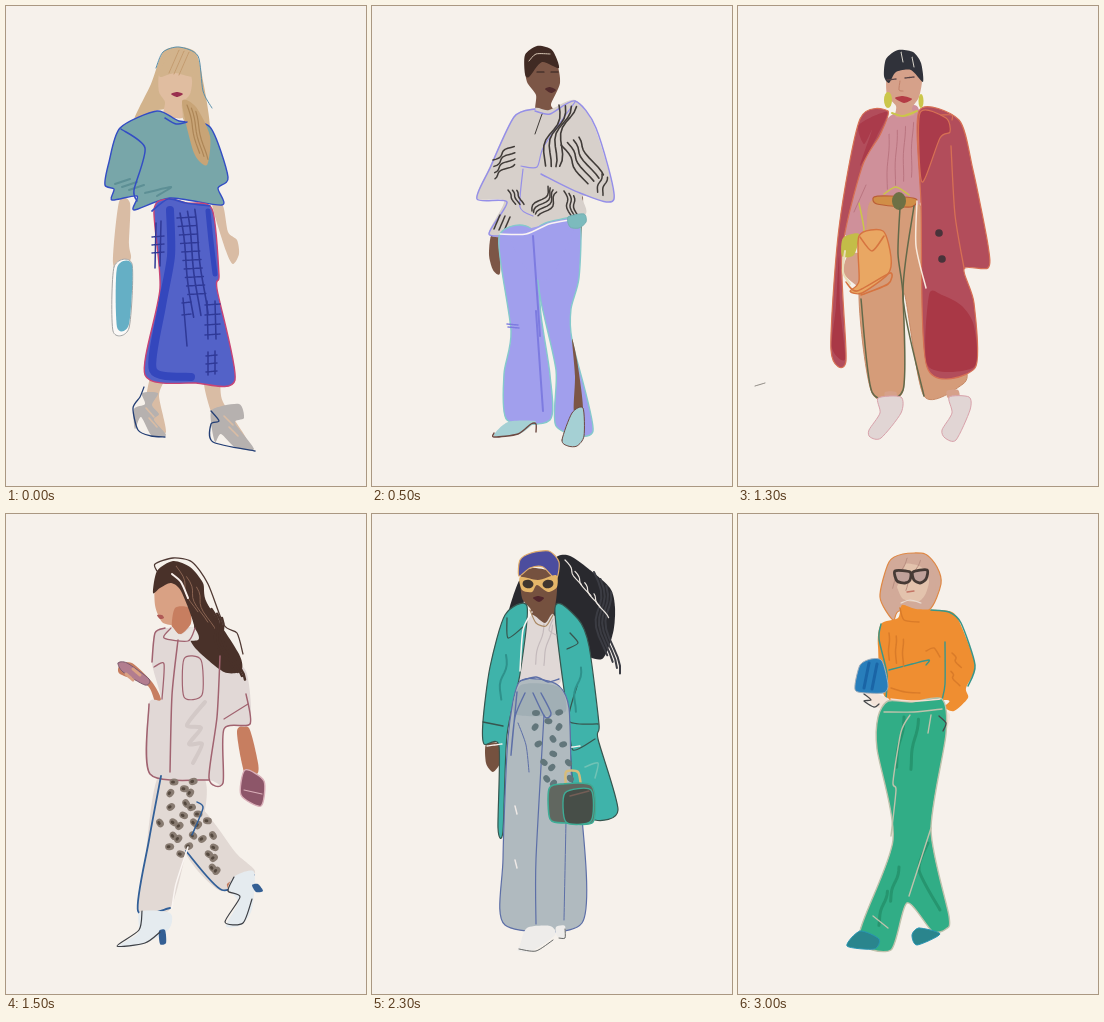
An HTML page with a canvas for the animation above (3500 ms loop, 360x480 px).

```html
<!DOCTYPE html>
<html lang="en">
<head>
<meta charset="utf-8">
<title>Seven looks</title>
<style>
html, body { margin: 0; width: 100%; height: 100%; overflow: hidden; background: #f6f1eb; }
canvas { display: block; }
</style>
</head>
<body>
<canvas id="stage" width="360" height="480"></canvas>
<script>
const ctx = document.getElementById('stage').getContext('2d');
const PAPER = '#f6f1eb', HOLD = 500;

// Traces a softly rounded curve through "x,y x,y ..." points.
function trace(text, closed) {
  const pts = text.split(' ').map(p => p.split(',').map(Number));
  const n = pts.length, k = 0.13;
  const at = i => closed ? pts[(i + n) % n] : pts[Math.max(0, Math.min(n - 1, i))];
  ctx.beginPath();
  ctx.moveTo(...pts[0]);
  for (let i = 0; i < (closed ? n : n - 1); i++) {
    const [a, b, c, d] = [at(i - 1), at(i), at(i + 1), at(i + 2)];
    ctx.bezierCurveTo(b[0] + (c[0] - a[0]) * k, b[1] + (c[1] - a[1]) * k,
      c[0] - (d[0] - b[0]) * k, c[1] - (d[1] - b[1]) * k, c[0], c[1]);
  }
}

function stroke(color, width) {
  ctx.strokeStyle = color;
  ctx.lineWidth = width;
  ctx.stroke();
}

function shape(color, pts, edge, width = 1.4) {
  trace(pts, true);
  ctx.fillStyle = color;
  ctx.fill();
  if (edge) stroke(edge, width);
}

function ink(color, width, pts) {
  trace(pts, false);
  stroke(color, width);
}

function dot(color, x, y, rx, ry = rx, turn = 0) {
  ctx.beginPath();
  ctx.ellipse(x, y, rx, ry, turn, 0, 7);
  ctx.fillStyle = color;
  ctx.fill();
}

// Parallel hand-drawn strokes along (dx, dy), each moved on by (sx, sy).
function strands(color, width, count, x, y, dx, dy, sx, sy, sway = 0) {
  for (let i = 0; i < count; i++) {
    ctx.beginPath();
    for (let t = 0; t <= 1.01; t += 0.1) {
      const bend = sway * Math.sin(t * 7 + i * 0.5);
      ctx.lineTo(x + i * sx + dx * t + bend, y + i * sy + dy * t + bend * 0.4);
    }
    stroke(color, width);
  }
}

// Staggered spots between two slanted edges.
function spots(color, x, y, cols, rows, gapX, gapY, slant, draw = dot) {
  for (let r = 0; r < rows; r++) for (let c = 0; c < cols; c++) {
    const wobble = Math.sin(r * 5 + c * 3);
    draw(color, x + c * gapX + r * slant + wobble * 3, y + r * gapY + (c % 2) * gapY / 2 + wobble * 2, 4, 3, wobble);
  }
}

function blueSkirt() {
  const skin = '#d9bca4', hair = '#d2b38c', teal = '#78a6a9', blue = '#334dc4', navy = '#2f3997';
  shape(skin, '113,196 124,197 123,238 125,252 117,264 107,257');
  shape(skin, '206,198 217,200 222,226 231,234 233,248 227,258 220,245');
  shape(skin, '145,370 158,373 153,390 160,426 147,426 139,404');
  shape(skin, '198,375 213,376 217,396 242,436 223,434 206,408');
  shape(hair, '157,46 173,41 190,47 198,80 204,122 200,160 174,108 152,104 128,115 145,78');
  shape('#e0bda0', '153,69 162,61 181,62 186,74 184,88 176,98 176,112 158,109 159,96 153,86');
  shape(hair, '155,62 165,48 181,48 187,70 169,67 154,71');
  strands('#c49c70', 1, 3, 173, 44, -10, 23, 5, 1);
  shape('#99304f', '165,88 171,86 177,88 171,91');
  shape(teal, '151,105 173,115 204,121 222,171 212,182 216,199 164,192 128,204 131,190 106,194 108,183 99,179 103,156 114,122', blue);
  shape('#c8a476', '176,96 190,101 204,130 201,159 188,147');
  strands('#ad8657', 1.2, 3, 181, 99, 12, 48, 4, 3, 1);
  strands('#5d8f95', 2, 3, 109, 178, 15, -5, 7, 3);
  ink('#5d8f95', 2, '139,187 165,181 151,190');
  ink(blue, 1.5, '115,123 139,142 128,184 131,195');
  ink(blue, 1.5, '159,112 170,118 181,116');
  ink('#5990ac', 1, '150,62 157,46 173,41 192,50 197,85 206,102');
  shape('#5362c8', '148,204 162,193 180,197 206,203 213,269 211,283 229,374 190,377 139,369 154,282', '#c84475');
  ink('#3447bd', 8, '164,204 165,250 156,300 147,364 185,371');
  ink('#3447bd', 5, '202,205 205,235 209,268');
  ink(blue, 1.7, '146,205 162,193 180,197 204,200');
  strands(navy, 1.6, 3, 174, 207, 13, 104, 7, -2, 1);
  strands(navy, 1.4, 10, 171, 212, 18, -1, 1.2, 8.5);
  strands(navy, 1.5, 2, 150, 217, -1, 45, 5, -2);
  strands(navy, 1.4, 3, 146, 231, 12, -1, 0, 8);
  strands(navy, 1.5, 2, 201, 295, 1, 38, 8, 0);
  strands(navy, 1.4, 4, 199, 299, 15, -1, 0, 10);
  strands(navy, 1.5, 2, 202, 346, 0, 23, 7, -1);
  strands(navy, 1.4, 3, 200, 350, 11, -1, 0, 8);
  strands(navy, 1.5, 1, 177, 292, 4, 48, 0, 0);
  strands(navy, 1.4, 2, 176, 297, 9, -1, 0, 12);
  shape('#fbf9f7', '108,261 126,258 123,322 107,325', '#a4a5a5', 1);
  shape('#65afc5', '111,262 126,259 123,318 111,321');
  shape('#b6b1af', '136,387 152,387 146,399 153,408 148,414 160,429 146,430 135,411 129,423 128,403 139,398');
  shape('#b6b1af', '207,403 233,398 238,412 229,417 248,443 229,441 215,428 209,436 205,416');
  strands(skin, 1.6, 2, 140, 402, 8, 9, 3, 10);
  strands(skin, 1.6, 2, 218, 410, 9, 9, 5, 11);
  ink('#243f75', 1.3, '138,381 134,391 127,402 132,424 145,430 159,431');
  ink('#243f75', 1.3, '205,405 213,415 205,418 207,436 249,445');
}

function lavenderTrousers() {
  const skin = '#7c5646', violet = '#958fe8', mint = '#85c9cc', black = '#403b38';
  shape(skin, '154,60 168,53 184,57 188,77 179,98 182,105 164,105 164,89 155,76');
  shape(skin, '203,187 211,191 208,246 202,256 194,248 202,219');
  shape(skin, '119,230 127,230 128,267 121,264 117,249');
  shape('#402a23', '153,68 153,49 165,40 180,44 187,62 170,56 157,71');
  strands('#2e211e', 1.2, 2, 165, 66, 7, 0, 14, 0);
  ink('#d8c7b5', 1, '157,55 164,48 178,48');
  shape('#522b2c', '173,83 178,81 184,84 179,87');
  shape('#d7d0cb', '163,102 177,104 203,94 223,122 242,193 211,190 213,209 168,222 147,231 117,228 132,195 105,192 118,160 142,111');
  ink(violet, 1.5, '163,103 142,111 118,162 105,193 135,196 117,228 143,229');
  ink(violet, 1.5, '163,105 178,108 203,95 224,122 242,193 208,187 169,168');
  ink(violet, 1.2, '203,96 172,140 165,161 149,160');
  ink(violet, 1.2, '151,163 148,201 161,210');
  strands(black, 1.6, 4, 187, 99, -16, 60, 4.5, 0, 4);
  strands(black, 1.6, 4, 189, 139, 25, 38, 5, -3, 3);
  strands(black, 1.5, 4, 121, 154, 20, -14, 0, 6, 2);
  strands(black, 1.5, 4, 160, 205, 18, -24, 3, 2, -3);
  strands(black, 1.5, 3, 192, 185, 7, 26, 4, 2, 2);
  strands(black, 1.5, 3, 136, 184, 7, 14, 4, 0, 1);
  strands(black, 1.5, 3, 128, 209, -6, 14, 5, 1);
  strands(black, 1.5, 2, 230, 168, -5, 18, 5, 3, 1);
  strands(black, 1, 1, 170, 108, -7, 20, 0, 0);
  shape('#a19fed', '127,231 161,225 169,309 178,369 178,414 135,414 132,368 139,325', mint);
  shape('#a19fed', '163,226 190,213 208,216 207,272 199,303 200,334 221,425 184,420 184,364 168,290', mint);
  shape('#a19fed', '140,231 190,215 204,217 180,270 160,270');
  shape(skin, '200,333 205,354 211,402 202,405 203,370');
  strands('#7d7be0', 1.4, 2, 135, 318, 11, 1, 1, 3);
  strands('#7d7be0', 2, 2, 161, 230, 7, 100, 3, 75);
  ink('#faf4f3', 1.5, '128,228 154,228 177,218 198,214');
  shape('#7cbbbd', '196,211 212,208 214,216 207,222 198,221', '#74afb2', 1);
  shape('#a5d0d4', '122,430 136,416 163,415 160,419 147,428');
  shape('#a5d0d4', '190,434 200,407 211,402 212,430 205,440 196,440', '#6c4841', 1);
  ink('#6c4841', 1.4, '122,427 122,431 146,428 159,418 164,418 164,426');
}

function redCoat() {
  const skin = '#d6a18a', edge = '#d77054', lime = '#cbc64a', dark = '#a93846';
  shape('#d59c79', '132,193 179,195 189,249 189,350 226,363 225,378 186,390 166,287 165,385 134,387 121,290', '#c88b68', 1);
  shape('#cf909a', '150,112 160,106 181,104 183,196 134,194 127,226 106,226 122,156 139,126');
  shape('#b24d5b', '150,105 122,113 101,222 93,344 108,355 104,247 124,161 142,129', edge, 1.2);
  shape('#b24d5b', '181,105 221,114 235,164 250,239 250,262 226,263 236,297 237,362 189,361 183,198', edge, 1.2);
  shape(dark, '191,289 204,289 224,300 236,320 236,361 190,360');
  shape(dark, '101,250 98,300 94,342 107,353 102,300');
  shape('#aa3b4b', '149,106 121,119 126,138 134,124 122,160 139,130');
  shape('#aa3b4b', '182,107 208,112 212,126 202,132 184,176', edge, 1.2);
  ink(edge, 1.3, '213,140 217,209 226,262');
  ink(edge, 1.2, '203,109 214,109 214,114');
  shape(skin, '149,69 159,61 176,63 184,72 181,91 174,102 176,109 158,111 158,100 149,89');
  shape(skin, '109,251 121,248 132,274 126,284 106,268');
  shape('#30323a', '146,70 148,53 160,44 175,46 183,57 185,76 173,64 158,66 151,77');
  strands('#d8d4ca', 1, 2, 163, 46, 2, 10, 11, 5);
  strands('#584344', 1.3, 2, 149, 74, 9, -1, 18, -2);
  ink('#c18169', 1, '162,75 161,84 165,85');
  shape('#b43c45', '157,92 165,90 174,93 166,97');
  dot(lime, 150, 94, 4, 8);
  dot(lime, 183, 95, 2.5, 7);
  ink(lime, 2, '154,107 165,110 179,105');
  ink(lime, 1.6, '108,231 126,229 121,197');
  shape('#c3bd48', '105,232 121,228 116,249 104,250');
  strands('#ba7580', 1, 4, 151, 128, -2, 55, 8, -4, 0.6);
  ink('#ba7580', 1, '116,206 128,179');
  shape('#d08e47', '136,191 153,190 178,193 173,201 139,198', '#bb5f36', 1.2);
  ink(lime, 1.5, '146,188 158,181 171,189');
  dot('#6e7045', 161, 195, 7, 9);
  ink('#63694a', 1.5, '162,202 160,248 165,290 165,384 134,386 123,293');
  ink('#63694a', 1.5, '176,200 165,291 186,390');
  ink('#f9eadd', 1.5, '179,195 178,240 188,282');
  shape('#e9a763', '121,230 145,225 153,251 150,268 124,287 112,285 121,275', '#d67440');
  ink('#d67440', 1.6, '122,231 134,245 146,230');
  ink('#d67440', 1.6, '108,276 119,285 152,267 150,278 123,289');
  ink('#e9ddb7', 2, '107,245 105,266 112,278');
  dot('#48333a', 201, 227, 3.8);
  dot('#48333a', 204, 253, 3.8);
  shape(skin, '147,386 158,386 158,394 148,394');
  shape(skin, '209,385 220,384 221,392 210,392');
  shape('#e1d5d4', '140,392 163,391 163,407 143,432 132,431 131,424 142,407', '#d8a1aa', 1);
  shape('#e1d5d4', '211,391 231,391 232,404 218,434 207,432 204,424 214,407', '#d8a1aa', 1);
  ink('#77716b', 0.8, '17,380 27,377');
}

function leopardTrousers() {
  const skin = '#c77e60', edge = '#a16370', blue = '#315f98', black = '#3e4045';
  shape('#e2d9d4', '153,261 197,263 199,296 183,328 164,395 132,397 139,346');
  shape('#e2d9d4', '192,292 230,339 249,359 215,377 179,337');
  shape(skin, '231,217 243,214 252,249 251,260 239,261');
  shape(skin, '114,151 126,149 146,168 155,185 151,194 142,172 114,160');
  shape(skin, '221,370 232,364 234,375 225,378');
  shape('#e1d8d6', '163,114 149,118 146,149 155,185 143,190 144,260 203,266 217,269 218,214 244,210 240,157 215,142 192,115');
  ink('#d3c9c7', 4, '199,188 181,211 195,214 183,230 196,230 187,249');
  shape('#d9a184', '150,64 166,58 176,74 185,108 173,120 167,112 156,108 149,91');
  shape(skin, '169,94 183,94 185,109 175,120 166,113');
  shape('#493129', '147,79 151,57 167,47 184,53 197,69 201,89 233,140 235,157 218,158 193,138 184,125 188,111 175,77 165,69 154,74');
  strands('#896351', 1, 3, 170, 52, 20, 45, 9, 10, 3);
  strands('#493129', 2.5, 4, 199, 90, 24, 62, 4, 4, 5);
  ink('#4f3933', 1.3, '151,57 149,50 167,44 186,48 202,70 218,111 231,119 237,140');
  ink('#f9efeb', 2, '166,60 175,68 182,84');
  shape('#b05a56', '151,101 156,101 158,104 154,105');
  shape('#e9e3df', '165,112 174,121 187,113 192,126 160,125');
  ink(edge, 1.5, '159,114 149,119 146,148');
  ink(edge, 1.5, '143,190 144,260 203,266');
  ink(edge, 1.3, '156,185 158,150 148,153');
  ink(edge, 1.3, '165,114 158,124 182,127 189,114');
  ink(edge, 1.5, '172,126 166,181 164,258');
  ink(edge, 1.5, '214,142 211,203 203,264 217,269 218,215 244,210 240,180');
  ink(edge, 1.2, '242,190 218,205');
  shape('#e1d8d6', '178,145 195,146 196,181 178,183', edge, 1.2);
  shape('#b27d8f', '112,149 121,149 143,165 139,171 117,158', '#7c5c6f', 1);
  strands('#d9a184', 3, 2, 120, 160, 7, 6, 7, -5);
  const rosette = (color, x, y, rx, ry, turn) => {
    dot(color, x, y, rx + 0.5, ry + 0.5, turn);
    dot('#54483e', x - 1, y, 2, 1.5, turn);
  };
  spots('#887b71', 168, 268, 3, 6, 10, 13, -0.8, rosette);
  spots('#887b71', 192, 300, 2, 5, 9, 13, 3, rosette);
  rosette('#887b71', 154, 309, 4, 3, 1);
  ink(blue, 1.8, '155,262 143,326 132,397 164,394');
  ink(blue, 1.8, '180,337 216,376 248,361');
  ink(blue, 1.5, '186,321 197,294 191,288');
  ink('#faf5f2', 1.5, '182,333 170,370 166,394');
  shape('#8d5669', '239,256 258,267 255,292 235,281', '#d9afb8');
  ink('#d9afb8', 1.2, '238,276 256,280');
  shape('#e5ebef', '134,398 164,399 163,415 138,430 111,433 132,419');
  shape('#e5ebef', '229,362 248,358 246,395 235,411 220,412 232,388 222,375');
  shape('#345f94', '153,417 159,416 160,429 154,430');
  shape('#345f94', '246,371 252,370 257,377 250,378');
  ink(black, 1.2, '136,397 133,416 111,432 139,429 154,418');
  ink(black, 1.2, '228,363 222,377 234,383 219,408 237,409 246,385');
}

function tealCoat() {
  const skin = '#75513f', teal = '#3fb3aa', dark = '#37564f', blue = '#5d6fa7', white = '#f9f4f1';
  shape('#29292e', '181,49 195,41 213,52 238,74 243,94 241,119 230,145 207,137 182,107');
  shape('#29292e', '147,67 136,101 149,96 153,78');
  strands('#3b3c43', 2, 4, 222, 58, 10, 82, 4, 6, 5);
  strands('#ebe5df', 1.2, 4, 193, 46, 15, 24, 9, 11, 2);
  shape(skin, '149,61 161,54 182,59 185,77 179,108 160,113 159,96 150,84');
  shape(skin, '114,230 127,230 129,247 121,258 114,249');
  shape(skin, '193,236 212,236 214,252 207,260 195,259');
  shape('#4c4d9e', '147,62 148,46 159,39 177,37 187,48 184,65 171,53 158,54', '#dfac6b', 1.2);
  shape('#e0d8d6', '159,101 173,109 181,100 190,120 188,169 147,169 151,125');
  shape(teal, '155,92 133,101 118,153 111,207 112,230 127,232 126,314 131,317 135,221 148,160', dark, 1.2);
  shape(teal, '183,94 206,105 217,132 227,210 226,225 246,296 223,306 203,287 196,207', dark, 1.2);
  ink(dark, 1.3, '135,104 136,124 151,113');
  ink(dark, 1.3, '198,119 206,129 195,135');
  ink(dark, 1.3, '111,208 131,212');
  ink(dark, 1.3, '205,172 197,207 226,210');
  ink(dark, 1.3, '197,207 201,236 223,225');
  strands('#2e918b', 2, 2, 134, 141, -6, 44, 74, 12, 2);
  ink('#71c3b6', 1.5, '213,253 226,249 223,264');
  ink(white, 1.5, '160,98 151,116 148,157');
  strands(white, 1.3, 2, 115, 232, 15, -2, 78, 2);
  shape('#b0babf', '146,170 166,165 187,172 197,194 200,270 210,304 210,409 133,411 131,345 136,224', blue, 1.2);
  shape('#a1afb5', '149,171 187,173 194,197 171,202 142,199');
  ink(blue, 1.4, '145,178 139,241 143,203 153,179');
  ink(blue, 1.4, '161,179 173,203 179,199 169,179');
  ink(blue, 1.2, '172,201 164,345 164,410');
  ink(blue, 1.4, '148,167 164,163 176,168 187,165');
  ink(blue, 1, '146,209 154,231 157,258');
  ink(blue, 1, '194,307 192,406');
  spots('#62767b', 164, 199, 3, 5, 12, 16, 2);
  strands('#eee9e6', 1.5, 2, 143, 292, 2, 8, 0, 54);
  strands('#c4babc', 1.2, 2, 172, 110, -9, 40, 8, 1, 1);
  ink('#c4babc', 1.2, '181,105 177,116 184,121');
  ink('#a98863', 1.2, '158,96 164,109 174,112 181,101');
  shape('#e5b669', '148,63 166,66 184,61 185,73 176,78 165,71 160,78 150,76');
  dot('#40362f', 156, 70, 5.5, 4.3, 0.2);
  dot('#40362f', 176, 70, 5.5, 4.3, -0.2);
  shape('#51262c', '161,84 166,82 172,84 167,88');
  ink('#d7bc7b', 2.5, '194,273 194,258 206,258 209,272');
  shape('#616760', '177,275 190,270 220,272 221,308 193,309 178,305', '#3eac96', 1.6);
  shape('#474e48', '193,279 219,276 219,307 194,308', '#3eac96');
  ink('#735e56', 1.5, '198,282 217,277');
  shape('#eeecea', '155,414 178,412 183,421 160,437 146,437 148,431');
  shape('#eeecea', '184,413 193,412 192,425 185,422');
  ink('#656766', 1, '147,435 164,437 181,426');
  ink('#656766', 1, '187,424 193,424 193,415');
}

// A ragged round flower.
function bloom(color, x, y, rx, ry, petals) {
  ctx.beginPath();
  for (let a = 0; a < 6.28; a += 0.1) {
    const r = 1 + 0.09 * Math.sin(a * petals);
    ctx.lineTo(x + rx * r * Math.cos(a), y + ry * r * Math.sin(a));
  }
  ctx.fillStyle = color;
  ctx.fill();
}

function floralSkirt() {
  const leg = '#bfb1a9', dark = '#292b3a', sky = '#88c5da', yellow = '#e3c13e', red = '#c34b51', navy = '#354057';
  shape(leg, '151,343 168,344 165,389 158,400 153,383');
  shape(leg, '181,344 201,344 195,397 183,397');
  shape(leg, '118,234 130,232 133,252 130,278 121,276 117,263');
  shape(dark, '137,53 143,41 157,38 174,48 165,60 187,70 188,83 158,82 152,108 142,101 141,75 149,57');
  strands('#5c5b69', 1.2, 2, 146, 47, 22, 3, 4, 16, 1);
  ink('#ae3338', 1.6, '141,51 138,41 149,34 166,35 178,43 171,59');
  ink('#ae3338', 1.6, '149,61 140,78 137,87 145,90');
  ink('#ae3338', 1.4, '165,80 172,86 187,81');
  shape('#cfc2b9', '155,82 186,83 186,104 180,117 158,117 152,104');
  shape('#c8434b', '167,99 173,98 179,100 173,104');
  shape('#e2dcd8', '151,112 187,114 209,125 222,168 188,188 147,194 137,239 120,238 118,205 127,121');
  ink(sky, 1.7, '147,111 166,122 190,118 188,113');
  ink(sky, 1.7, '149,114 128,121 118,192 114,227 120,238 130,236');
  ink(sky, 1.7, '190,120 203,121 211,137 221,166');
  ink(sky, 1.7, '146,158 154,174 142,181 149,188 137,211');
  strands('#cfc9c5', 1, 2, 132, 144, -4, 58, 67, -10);
  shape('#9bc9de', '137,219 148,195 162,186 187,184 189,261 218,274 230,331 223,344 135,345', '#dfb53a', 2);
  bloom(yellow, 150, 232, 15, 26, 9);
  bloom(navy, 148, 228, 10, 21, 11);
  shape(red, '185,187 189,193 189,225 171,224');
  shape(red, '143,269 154,257 177,262 187,303 185,330 159,337 141,328 136,300');
  bloom(yellow, 180, 278, 12, 27, 11);
  bloom(yellow, 169, 258, 14, 11, 9);
  bloom(yellow, 212, 306, 12, 14, 8);
  strands('#bd9a2b', 1, 4, 171, 262, 11, 7, 2, 10);
  shape(navy, '201,319 214,313 229,320 228,336 214,341 195,335');
  ink('#dfb53a', 2.4, '137,217 138,248 135,346 229,344');
  ink('#dfb53a', 2.2, '136,272 150,266 160,257');
  ink('#dfb53a', 2.2, '137,278 146,282 139,294 141,304');
  shape(PAPER, '193,170 199,166 216,169 249,239 221,275 187,263 188,225', '#b49f9a');
  strands('#b49f9a', 1.4, 3, 197, 170, 1, 33, 6, -2, 2);
  shape('#c4b7ae', '166,150 180,150 196,158 200,170 190,176 164,160');
  shape('#46464b', '160,146 173,145 173,156 161,155');
  ink('#cbc4c0', 2, '167,153 174,155');
  shape('#e8dfdc', '151,390 168,390 164,430 152,427');
  shape('#e8dfdc', '180,386 198,387 204,400 190,414 190,430 180,433');
  for (const x of [150, 166, 179, 200]) strands('#3e3f44', 1.3, 1, x, 380, 1, x % 3 ? 20 : 34, 0, 0, 3);
  ink('#3e3f44', 1.3, '153,423 157,431 165,433');
  ink('#3e3f44', 1.3, '178,428 183,435 188,430');
}

function greenTrousers() {
  const hair = '#d2aa99', edge = '#bfc2ac', rust = '#d97b29', shade = '#26956f', frame = '#463a35';
  shape(hair, '151,48 165,40 187,40 199,53 203,70 191,96 161,97 155,106 142,83', '#df8844', 1.2);
  shape('#e3c3ad', '157,63 166,50 183,53 191,66 187,81 179,88 164,84');
  ink(hair, 6, '165,48 160,62 153,80');
  ink(hair, 6, '184,46 194,65 194,84');
  strands('#b98f81', 1, 2, 169, 44, -15, 30, 13, 2, 1);
  ink('#e9dcd3', 1.2, '163,89 172,86 183,89');
  shape('#ef8e31', '164,91 178,95 211,97 221,107 237,151 228,174 230,184 216,197 206,193 209,186 149,185 140,133 143,110 160,104');
  ink('#39968a', 1.5, '143,110 141,125 149,160 148,185');
  ink('#39968a', 1.5, '193,96 211,98 223,109 237,151 230,172');
  ink('#39968a', 1.4, '207,128 207,170 204,186');
  ink('#39968a', 1.4, '151,156 174,150 191,146 188,151');
  strands(rust, 1.5, 3, 151, 119, 0, 27, 7, 3, 0.5);
  strands(rust, 1.5, 2, 214, 139, 8, 14, -2, 18, 2);
  ink(rust, 1.4, '188,137 196,134 202,143');
  ink(rust, 1.4, '162,94 166,106 181,108');
  ink(rust, 1.4, '153,174 167,178 182,179');
  shape('#f4e4d9', '128,177 151,185 146,195 134,190');
  shape('#f4e4d9', '201,196 212,201 207,220 200,213');
  shape('#31ad86', '150,187 174,188 204,185 208,220 193,316 211,402 208,415 194,417 169,389 153,436 121,422 155,326 139,235 140,203', edge);
  strands(shade, 3, 2, 166, 203, -8, 50, 14, 2, 1);
  strands(shade, 3, 2, 161, 353, -9, 34, -12, 24, 1);
  ink(shade, 3, '190,329 181,356 202,396');
  ink(edge, 1.4, '146,198 176,198 204,195');
  ink(edge, 1.4, '172,201 163,218 155,268 158,276 153,322');
  ink(edge, 1.4, '193,314 171,382');
  ink(edge, 1.4, '193,201 190,219');
  ink(edge, 1.3, '135,402 150,414');
  ink('#f5dfd2', 1.5, '153,185 176,187 202,185');
  ink('#46484a', 1.3, '126,180 133,186 126,187 136,193 141,190');
  ink('#46484a', 1.3, '201,202 208,209 205,217');
  shape('#287ebb', '122,151 133,145 144,147 150,171 145,179 120,178 117,171', '#9faebb', 1);
  strands('#1a65a6', 3, 2, 131, 149, -5, 25, 8, 1);
  shape('#bfa19a', '157,57 172,58 172,66 167,69 159,67', frame, 2.8);
  shape('#bfa19a', '175,58 189,56 188,65 182,69 176,66', frame, 2.8);
  ink('#c37465', 1.3, '169,78 176,77');
  shape('#2a858d', '122,417 141,425 136,435 109,432', '#2995b3', 1);
  shape('#2a858d', '181,414 202,420 179,431 174,421', '#2995b3', 1);
}

const looks = [blueSkirt, lavenderTrousers, redCoat, leopardTrousers, tealCoat, floralSkirt, greenTrousers];
const start = performance.now();
let shown = -1;

function render(now) {
  const index = Math.floor(Math.max(0, now - start) / HOLD) % looks.length;
  if (index !== shown) {
    shown = index;
    ctx.fillStyle = PAPER;
    ctx.fillRect(0, 0, 360, 480);
    looks[index]();
  }
  requestAnimationFrame(render);
}

ctx.lineCap = ctx.lineJoin = 'round';
render(start);
</script>
</body>
</html>
```
